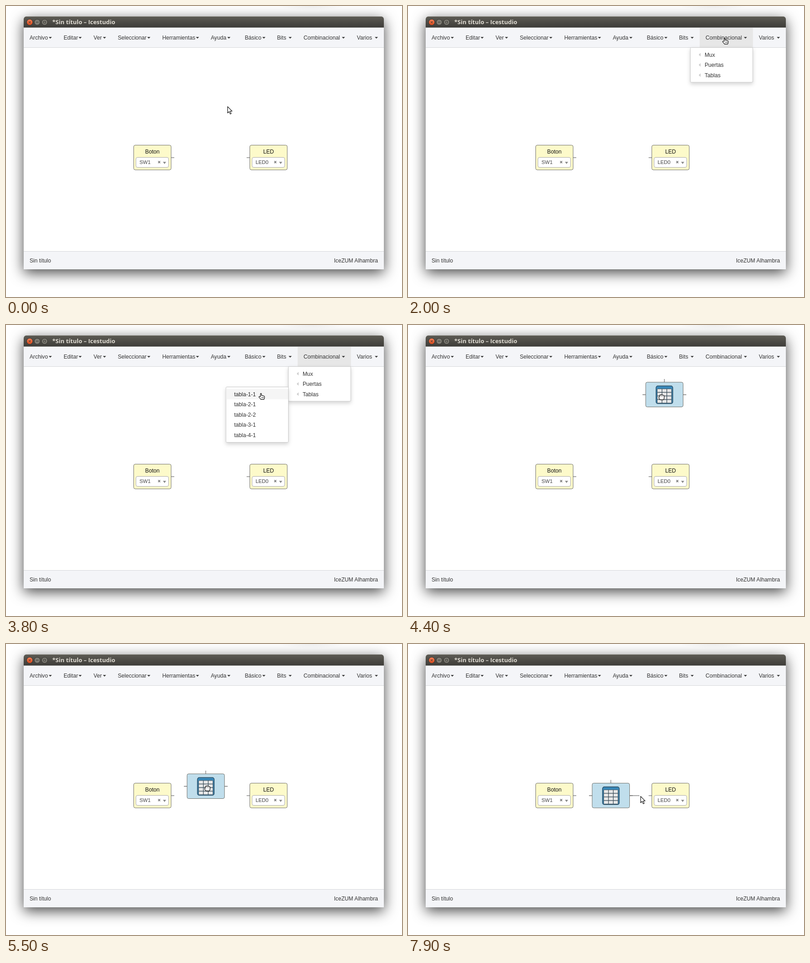
These frames come from a looping animation (873x641 px, 8 s). An HTML page:

```html
<!DOCTYPE html>
<html lang="es">
<head>
<meta charset="utf-8">
<title>Icestudio</title>
<style>
html, body { margin: 0; width: 100%; height: 100%; overflow: hidden; background: #fff; }
#stage { position: relative; width: 873px; height: 641px; overflow: hidden;
  background: radial-gradient(ellipse 75px 10px at 672px 0, #f1f1f1, #fff); }
#win { position: absolute; left: 39px; top: 23px; width: 794px; height: 557px;
  border-radius: 6px 6px 0 0; box-shadow: 0 8px 30px rgba(0,0,0,.72); }
svg { position: absolute; left: 0; top: 0; display: block; }
text { font: 12.13px "Liberation Sans", Arial, sans-serif; fill: #333; white-space: pre; }
.title { font: bold 13px "Open Sans", sans-serif; fill: #dfdbd2; }
.name { fill: #111; }
.pin { font-size: 11.3px; fill: #444; }
.menu { fill: #fff; stroke: #c9c9c9; filter: drop-shadow(0 4px 4px rgba(0,0,0,.17)); }
.row { fill: #f5f5f5; }
.hover text { fill: #262626; }
.wire { stroke: #777; stroke-width: 1.3; fill: none; }
.cursor { fill: #fff; stroke: #000; stroke-width: 1.1; stroke-linejoin: round; }
</style>
</head>
<body>
<div id="stage">
<div id="win"></div>
<svg id="art" width="873" height="641" viewBox="0 0 873 641">
  <defs>
    <linearGradient id="bar" x2="0" y2="1">
      <stop stop-color="#5d5b54"/><stop offset="1" stop-color="#3d3c38"/>
    </linearGradient>
    <linearGradient id="close" x2="0" y2="1">
      <stop stop-color="#f4825a"/><stop offset="1" stop-color="#dd4b1c"/>
    </linearGradient>
  </defs>
  <path d="M39 48V29a6 6 0 0 1 6-6H827a6 6 0 0 1 6 6V48Z" fill="url(#bar)"/>
  <path d="M44 23.5H828" stroke="#716f67"/>
  <g stroke="#34332f">
    <circle cx="52.3" cy="35.7" r="6.7" fill="url(#close)"/>
    <circle cx="68.8" cy="35.7" r="6.5" fill="#7d7b73"/>
    <circle cx="85.1" cy="35.7" r="6.5" fill="#7d7b73"/>
    <path d="M50 33.4l4.6 4.6m0-4.6l-4.6 4.6M66 35.7h5.6M82.8 33.5h4.6v4.4h-4.6z" fill="none"/>
  </g>
  <text class="title" x="102" y="40">*Sin título – Icestudio</text>
  <path d="M39 47.5H833V92H39Z" fill="#f4f5f8"/>
  <path d="M39 92H833V540H39Z" fill="#fff"/>
  <path d="M39 540H833V580H39Z" fill="#f4f5f8"/>
  <path d="M39 91.5H833M39 540.5H833" stroke="#d5d7da"/>
  <path id="active" d="M643 48H760.5V91H643Z" fill="#e7e7e7"/>
  <g id="nav"></g>
  <text x="52" y="565">Sin título</text>
  <text x="820" y="565" text-anchor="end">IceZUM Alhambra</text>
  <g id="pins"></g>
  <g id="table"></g>
  <g id="menu"><rect class="menu" x="622.5" y="91.5" width="137.5" height="76.5" rx="2"/></g>
  <g id="sub"><rect class="menu" x="485" y="136.5" width="137.5" height="122" rx="2"/></g>
  <path id="arrow" class="cursor" d="M.6.6V14.6L3.9 11.6L6.1 16.9L8.5 15.9L6.2 10.7H10.4Z"/>
  <g id="hand" class="cursor">
    <path d="M4 8V1.8Q4 .6 5.1.6T6.2 1.8V5.2Q8 4.5 8.5 5.7Q10.2 5 10.7 6.3Q12.9 6 12.9 8V10.5Q12.5 12 11.8 13.9H4.8Q3.8 11.8.8 9.3Q.2 7.6 1.8 7.2Q3 7.2 4 8Z"/>
    <path d="M6.9 8.6V11M8.8 8.6V11M10.7 8.6V11" stroke-width=".8"/>
  </g>
  <g id="grab" class="cursor">
    <path d="M2.4 6.8V3.2Q3.3 1.4 4.7 2.6Q5.7.9 7.2 2.2Q8.8 1.2 9.8 2.8Q12.4 2.2 12.8 4.6V8.5L11.6 12.6H4L1 9Q.4 6.7 2.4 6.8Z"/>
    <path d="M5 4.2V5.6M7.4 4.2V5.6M9.9 4.4V5.8" stroke-width=".8"/>
  </g>
  <g id="cross" fill="none">
    <path d="M-7 0H7M0-7V7" stroke="#fff" stroke-width="3"/>
    <path d="M-6.5 0H6.5M0-6.5V6.5" stroke="#000"/>
  </g>
</svg>
</div>
<script>
const LOOP = 8000, TICK = 100;
const $ = id => document.getElementById(id);

function add(parent, tag, attrs, text) {
  const el = document.createElementNS("http://www.w3.org/2000/svg", tag);
  for (const key in attrs) el.setAttribute(key, attrs[key]);
  if (text) el.textContent = text;
  return parent.appendChild(el);
}
const show = (el, on) => { el.style.display = on ? "" : "none"; };
const place = (el, x, y) => el.setAttribute("transform", `translate(${x} ${y})`);

// label, text x, caret x
[["Archivo", 52, 94.2], ["Editar", 127, 160], ["Ver", 193, 213.6],
 ["Seleccionar", 246.5, 311.3], ["Herramientas", 344.5, 418.6],
 ["Ayuda", 451.5, 487.8], ["Básico", 526.5, 565], ["Bits", 597.5, 623],
 ["Combinacional", 656, 740.4], ["Varios", 773.5, 813]
].forEach(([label, x, caret]) => {
  add($("nav"), "text", { x, y: 74 }, label);
  add($("nav"), "path", { d: `M${caret} 68.3h7l-3.5 3.5z`, fill: "#333" });
});

function menuRow(menu, label, left, textX, mid) {
  const row = add(menu, "g", {});
  const back = add(row, "rect", { class: "row", x: left + .5, y: mid - 11.2, width: 136.5, height: 22.5 });
  add(row, "text", { x: textX, y: mid + 4.4 }, label);
  return on => { show(back, on); row.setAttribute("class", on ? "hover" : ""); };
}
const kinds = ["Mux", "Puertas", "Tablas"].map((label, i) => {
  const mid = 107.2 + 22.5 * i, hover = menuRow($("menu"), label, 622.5, 654, mid);
  add($("menu"), "path", { d: `M645 ${mid - 4}v8l-4-4z`, fill: "#ccc" });
  hover(false);
  return hover;
});
const tables = ["1-1", "2-1", "2-2", "3-1", "4-1"].map((size, i) => {
  const hover = menuRow($("sub"), "tabla-" + size, 485, 503, 152.2 + 22.5 * i);
  hover(false);
  return hover;
});

function body(g, fill) {
  add(g, "rect", { width: 82.5, height: 54.5, rx: 3.5, fill, stroke: "#6f6f69" });
}
function pinBlock(x, name, pin, port) {
  const g = add($("pins"), "g", {});
  place(g, x, 306.5);
  add(g, "path", { class: "wire", d: `M${port} 27.5h7` });
  body(g, "#fdfaca");
  add(g, "text", { class: "name", x: 41.2, y: 18, "text-anchor": "middle" }, name);
  add(g, "rect", { x: 5, y: 27, width: 72, height: 22, rx: 3.5, fill: "#fff", stroke: "#aaa" });
  add(g, "text", { class: "pin", x: 12.7, y: 41.5 }, pin);
  add(g, "path", { d: "M54 35l4.4 4.6m0-4.6l-4.4 4.6", stroke: "#777", "stroke-width": 1.6 });
  add(g, "path", { d: "M64.5 36.8h7l-3.5 4.6z", fill: "#888" });
}
pinBlock(281.5, "Boton", "SW1", 82.5);
pinBlock(537.5, "LED", "LED0", -7);

const table = $("table");
add(table, "path", { class: "wire", d: "M-7 27.5h7M82.5 27.5h7M41.2-7v7" });
const wire = add(table, "path", { class: "wire" });
body(table, "#c0deec");
add(table, "rect", { x: 22.8, y: 8.2, width: 37, height: 39, rx: 4, fill: "#3a88b8", stroke: "#203d50", "stroke-width": 1.2 });
add(table, "rect", { x: 25, y: 14.3, width: 32.6, height: 32, rx: 2, fill: "#3d4f5b" });
for (let i = 0; i < 12; i++)
  add(table, "rect", { x: 26 + 10.6 * (i % 3), y: 15.2 + 7.9 * Math.floor(i / 3), width: 9.3, height: 6.5, fill: "#e8e8e8" });

// time, shape, x, y
const pointer = [
  [2400, "hand", 694, 78], [2900, "hand", 685, 147], [3000, "hand", 683, 155],
  [3300, "hand", 658, 154], [3400, "hand", 633, 152], [3600, "hand", 590, 151],
  [3800, "hand", 557, 150], [4400, "grab", 552, 152], [4500, "grab", 547, 154],
  [4900, "grab", 367, 251], [5100, "grab", 358, 275], [5200, "grab", 386, 291],
  [5400, "grab", 417, 303], [5500, "grab", 437, 311], [5800, "grab", 439, 318],
  [5900, "grab", 440, 323], [6000, "grab", 441, 326], [6200, "grab", 441, 328],
  [6300, "grab", 441.5, 330], [6800, "arrow", 506, 350], [7000, "arrow", 522, 350],
  [7100, "arrow", 534, 345], [7200, "arrow", 515, 336], [7300, "arrow", 502, 331],
  [7500, "cross", 498, 336], [7700, "cross", 498, 335], [7800, "arrow", 505, 335],
  [7900, "arrow", 512.3, 335]
];
// time, x, y
const drag = [
  [4400, 524, 126], [4900, 344, 223.5], [5100, 330, 244], [5200, 350.5, 265],
  [5400, 378, 279], [5500, 399.2, 286], [5800, 399.2, 293], [5900, 406, 293],
  [6000, 406, 300], [6300, 406, 306.5]
];
const at = (steps, t) => steps.filter(s => s[0] <= t).pop();

function pointerAt(t) {
  if (t >= 2400) return at(pointer, t).slice(1);
  if (t < 1200) {
    const p = Math.min(1, Math.max(0, (t - 200) / 900)), k = p * p * (3 - 2 * p);
    return ["arrow", 488 + 136 * k, 221 - 83 * k];
  }
  const p = Math.min(1, (t - 1100) / 700), k = p * (2 - p);
  const x = 624 + 69 * k, y = 138 - 68 * k;
  return [y < 90 ? "hand" : "arrow", x, y];
}

function draw(now) {
  const t = Math.floor(now % LOOP / TICK) * TICK;
  const open = t >= 2000 && t < 4400;
  show($("active"), open);
  show($("menu"), open);
  show($("sub"), open && t >= 2900);
  kinds[2](t >= 2900 && t < 3600);
  tables[0](t >= 3600);

  const pos = at(drag, t);
  show(table, pos);
  if (pos) place(table, pos[1], pos[2]);

  const [shape, x, y] = pointerAt(t);
  for (const id of ["arrow", "hand", "grab", "cross"]) show($(id), id === shape);
  place($(shape), x, y);

  show(wire, t >= 7800);
  if (t >= 7800) wire.setAttribute("d", `M82.5 27.5H${x - 408.3}`);
}
function loop() {
  draw(performance.now());
  requestAnimationFrame(loop);
}
loop();
</script>
</body>
</html>
```
